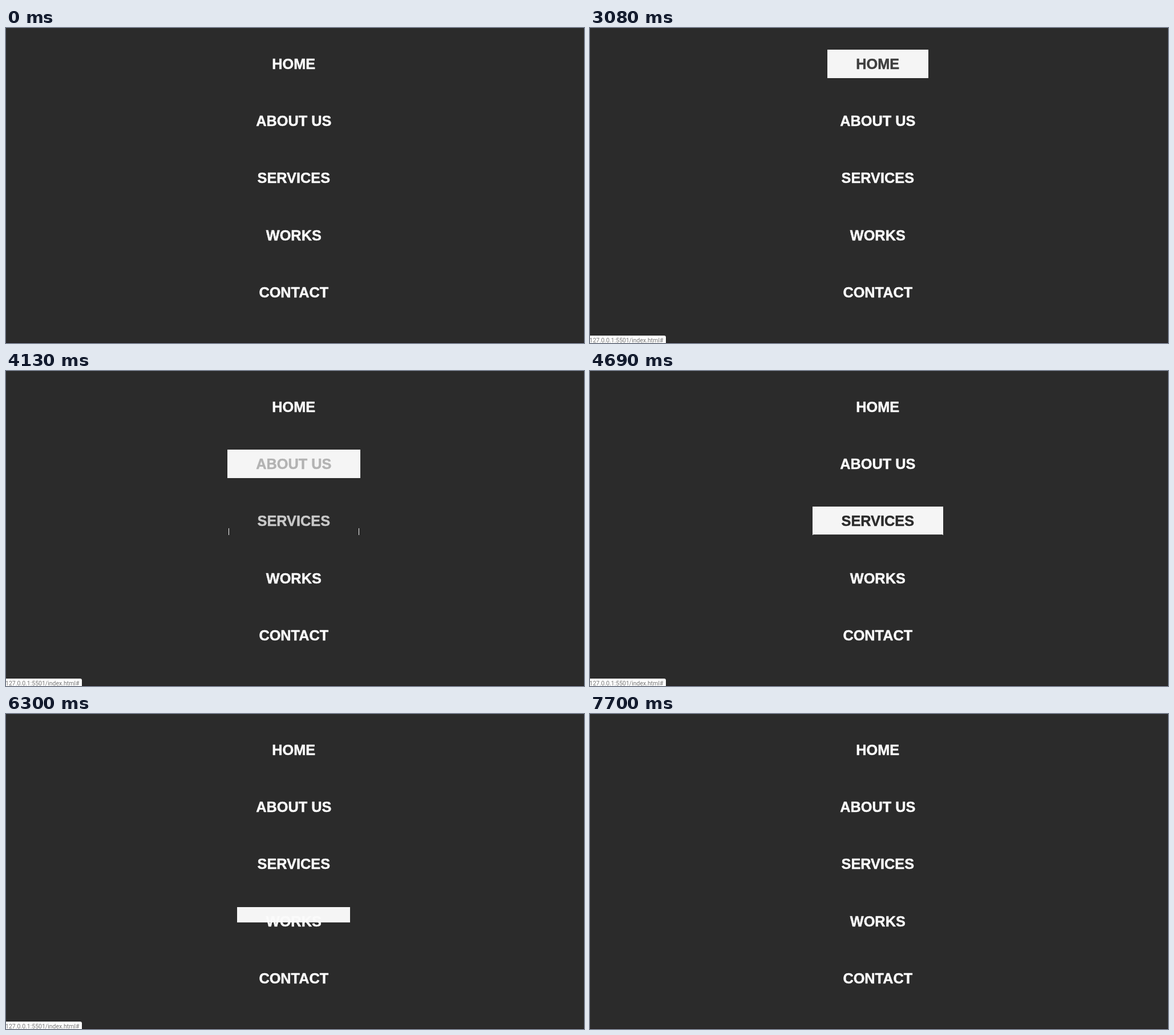
An HTML page with a canvas for the animation above (7.77 s loop, 1013x553 px).

```html
<!DOCTYPE html>
<html lang="en">
<head>
<meta charset="utf-8">
<title>Menu hover</title>
<style>
  html, body { margin: 0; width: 100%; height: 100%; overflow: hidden; background: #2b2b2b; }
  canvas { display: block; }
</style>
</head>
<body>
<canvas id="stage" width="1013" height="553"></canvas>
<script>
const ctx = document.getElementById('stage').getContext('2d');
const W = 1013, H = 553;
const LOOP = 7770, STEP = 70, RESET = 7700;
const DURATION = 400, FILL_DELAY = 300;
const CENTER = 504.3, TOP = 38, PITCH = 100.2, BOX_H = 50, PADDING = 101.3;
const DARK = 43, LIGHT = 251;
const BACK = 'rgb(43,43,43)', PANEL = 'rgb(245,245,245)';

// Pointer enter and leave times in ms
const items = [
  { label: 'HOME', enter: 2066, leave: 3040 },
  { label: 'ABOUT US', enter: 3120, leave: 3978 },
  { label: 'SERVICES', enter: 4060, leave: 4980 },
  { label: 'WORKS', enter: 5036, leave: 5890 },
  { label: 'CONTACT', enter: 6310, leave: 7125 }
];

const clamp = v => Math.min(1, Math.max(0, v));
const bezier = (a, b, s) => 3 * a * s * (1 - s) ** 2 + 3 * b * s * s * (1 - s) + s ** 3;

// Same curve as the CSS "ease" keyword
function ease(x) {
  if (x <= 0 || x >= 1) return clamp(x);
  let lo = 0, hi = 1;
  for (let i = 0; i < 24; i++) {
    const mid = (lo + hi) / 2;
    if (bezier(0.25, 0.25, mid) < x) lo = mid; else hi = mid;
  }
  return bezier(0.1, 1, lo);
}

function hover(item, time, delay = 0) {
  const phase = start => ease((time - start - delay) / DURATION);
  return phase(item.enter) - phase(item.leave);
}

function drawItem(item, index, time) {
  ctx.font = 'bold 25.3px "Liberation Sans", Arial, sans-serif';
  const textWidth = ctx.measureText(item.label).width;
  const half = (textWidth + PADDING) / 2;
  const left = Math.round(CENTER - half);
  const right = Math.round(CENTER + half);
  const top = Math.round(TOP + index * PITCH);
  const active = hover(item, time);
  const filled = hover(item, time, FILL_DELAY);

  ctx.fillStyle = PANEL;
  const lineHeight = BOX_H * active;
  for (const x of [left, right - 1]) {
    ctx.fillRect(x, top + BOX_H - lineHeight, 1, lineHeight);
  }
  ctx.fillRect(left, top, right - left, BOX_H * filled);

  const tone = Math.round(LIGHT + (DARK - LIGHT) * active);
  ctx.fillStyle = ctx.strokeStyle = `rgb(${tone},${tone},${tone})`;
  ctx.lineWidth = 0.5;
  ctx.lineJoin = 'round';
  const x = CENTER - textWidth / 2, y = top + 34;
  ctx.fillText(item.label, x, y);
  ctx.strokeText(item.label, x, y);
}

function drawStatus(time) {
  ctx.globalAlpha = clamp((time - items[0].enter - 80) / 120);
  ctx.fillStyle = '#fff';
  ctx.beginPath();
  ctx.roundRect(-5, 540, 138, 20, [0, 3, 0, 0]);
  ctx.fill();
  ctx.fillStyle = '#757575';
  ctx.font = '10.5px Roboto, sans-serif';
  ctx.fillText('127.0.0.1:5501/index.html#', -1, 552);
  ctx.globalAlpha = 1;
}

function draw(now) {
  const frameTime = Math.floor((now % LOOP) / STEP) * STEP;
  const time = frameTime >= RESET ? 0 : frameTime;
  ctx.fillStyle = BACK;
  ctx.fillRect(0, 0, W, H);
  ctx.fillStyle = '#231f20';
  ctx.fillRect(0, H - 1, W, 1);
  items.forEach((item, index) => drawItem(item, index, time));
  drawStatus(time);
}

const begin = performance.now();
function tick() {
  draw(performance.now() - begin);
  requestAnimationFrame(tick);
}
tick();
</script>
</body>
</html>
```
